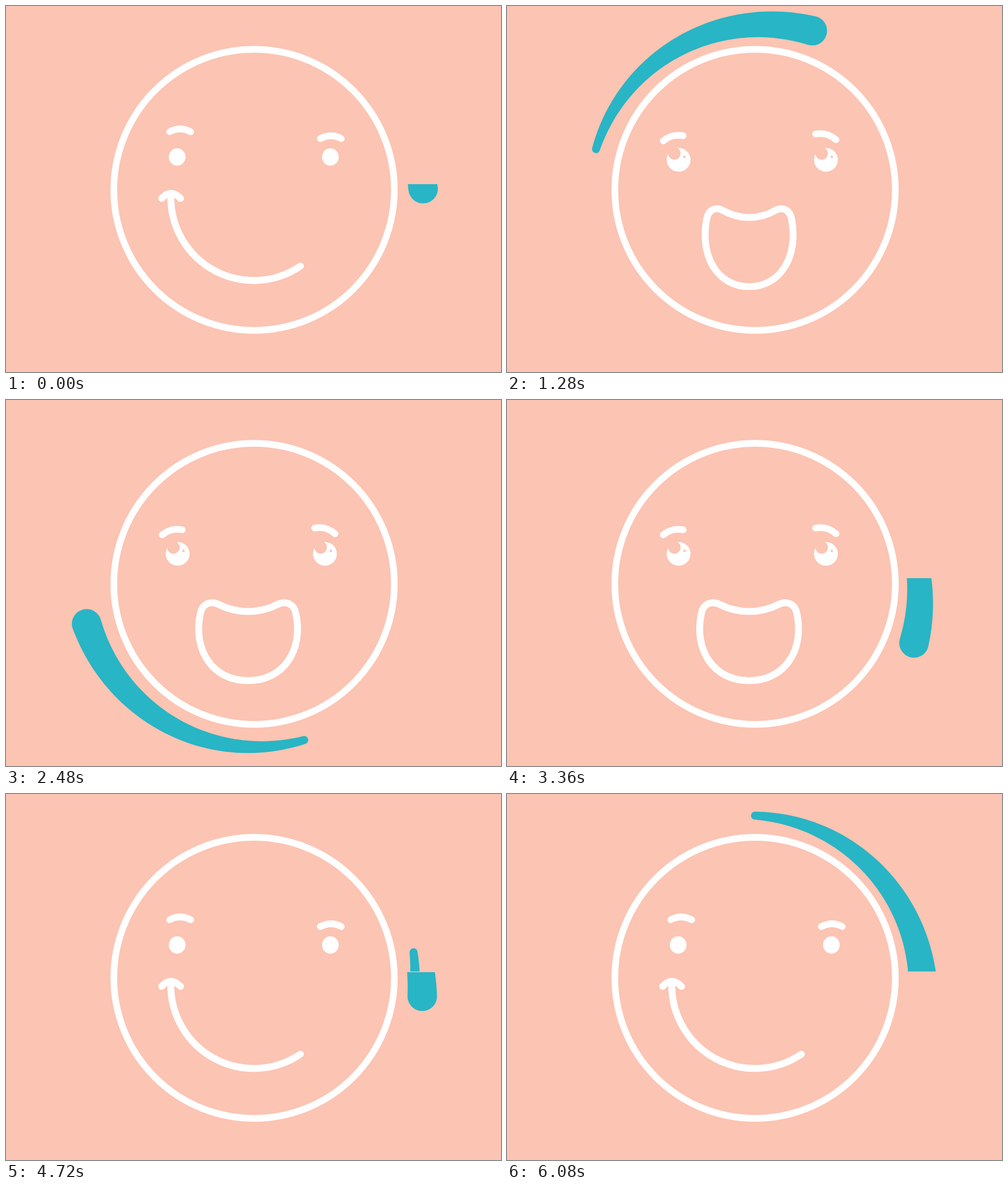
An HTML page with a canvas that plays this animation: 871x643 px, repeating every 6.16 s.

```html
<!DOCTYPE html>
<html>
<head>
<meta charset="utf-8">
<style>
  html, body { margin: 0; height: 100%; overflow: hidden; background: #fcc4b2; }
  canvas { display: block; }
</style>
</head>
<body>
<canvas id="stage" width="871" height="643"></canvas>
<script>
const ctx = document.getElementById('stage').getContext('2d');
const PINK = '#fcc4b2', TEAL = '#28b5c5', WHITE = '#fff';
const LOOP = 6160, STEP = 80;
const ramp = (t, from, to) => Math.min(1, Math.max(0, (t - from) / (to - from)));
const line = d => ctx.stroke(new Path2D(d));

// Swoosh: each lap starts slowly and speeds up; angles are in degrees
const LAPS = [0, 1510, 3175, 4660];
const CX = 434, CY = 325, SPAN = 95.3;
const headAngle = s => 110 * s + 67.3 * s ** 3.25 - 0.8;
const outer = f => 294 + 32 * (1 - f) ** 2;
const inner = f => 269 + 30.5 * (f - 0.4) ** 2;

// f runs from 0 at the head to 1 at the tail
function swoosh(deg) {
  const rad = f => (deg - f * SPAN) * Math.PI / 180;
  const spot = (f, r) => [CX + r * Math.cos(rad(f)), CY + r * Math.sin(rad(f))];
  // A lap emerges below the seam on the right and vanishes above it
  const top = deg < 135 ? 313 : 0, bottom = deg > 315 ? 311.7 : 643;
  ctx.save();
  ctx.beginPath();
  ctx.rect(0, top, 871, bottom - top);
  ctx.clip();
  ctx.beginPath();
  for (let i = 0; i <= 60; i++) ctx.lineTo(...spot(i / 60, outer(i / 60)));
  ctx.arc(...spot(1, 287), 7, rad(1), rad(1) + Math.PI, true);
  for (let i = 60; i >= 0; i--) ctx.lineTo(...spot(i / 60, inner(i / 60)));
  ctx.arc(...spot(0, 300), 26, rad(0) + Math.PI, rad(0), true);
  ctx.fillStyle = TEAL;
  ctx.fill();
  ctx.restore();
}

function oval(x, y, rx, ry, color) {
  ctx.fillStyle = color;
  ctx.beginPath();
  ctx.ellipse(x, y, rx, ry, 0, 0, 7);
  ctx.fill();
}

function calmEyes(lift) {
  ctx.save();
  ctx.translate(0, -lift);
  line('M288 221Q306 211 325 221');
  line('M553 233Q572 223 590 233');
  ctx.restore();
  for (const x of [301.2, 570.8]) oval(x, 265.2, 14.7, 15.3, WHITE);
}

function happyEyes() {
  line('M275 237Q290 224 310 228');
  line('M543 225Q563 221 579 235');
  for (const x of [302, 561.2]) {
    oval(x, 270.3, 21, 20.8, WHITE);
    oval(x - 7.5, 259, 11, 11, PINK);
    oval(x + 10.3, 265, 2.2, 2.2, PINK);
  }
}

function smile() {
  line('M274 338Q290 320 307 338');
  line('M290 330V336A146 146 0 0 0 518 457');
}

function grin() {
  line('M325 394C342 394 392 444 452 446C475 445 484 454 484 464' +
    'S460 488 431 488S301 446 301 416C301 404 311 394 325 394Z');
}

// One half of the open mouth, mirrored about its middle
function laugh(width) {
  const half = new Path2D('M0 371.5Q28 371.5 52 359C66 352 81 358 84 375C98 440 62 493 0 493');
  const path = new Path2D();
  for (const side of [-1, 1]) path.addPath(half, new DOMMatrix([side * width, 0, 0, 1, 426, 0]));
  ctx.stroke(path);
}

function draw(t) {
  ctx.fillStyle = PINK;
  ctx.fillRect(0, 0, 871, 643);

  for (const start of LAPS) {
    const age = t - start;
    if (age >= 0 && age < 1600) swoosh(headAngle(age / 1000));
  }

  ctx.strokeStyle = WHITE;
  ctx.lineCap = ctx.lineJoin = 'round';
  ctx.lineWidth = 11.7;
  ctx.beginPath();
  ctx.arc(436.5, 323, 246.8, 0, 7);
  ctx.stroke();

  const laughing = t >= 560 && t < 3600;
  if (laughing) happyEyes();
  else calmEyes(t < 560 ? 6 * ramp(t, 240, 400) : 0);

  ctx.lineWidth = 12.2;
  if (laughing) laugh(0.89 + 0.11 * ramp(t, 1280, 1600));
  else if (t >= 320 && t < 4240) grin();
  else smile();
}

function tick() {
  const t = performance.now() % LOOP;
  draw(Math.floor(t / STEP) * STEP);
  requestAnimationFrame(tick);
}
tick();
</script>
</body>
</html>
```
